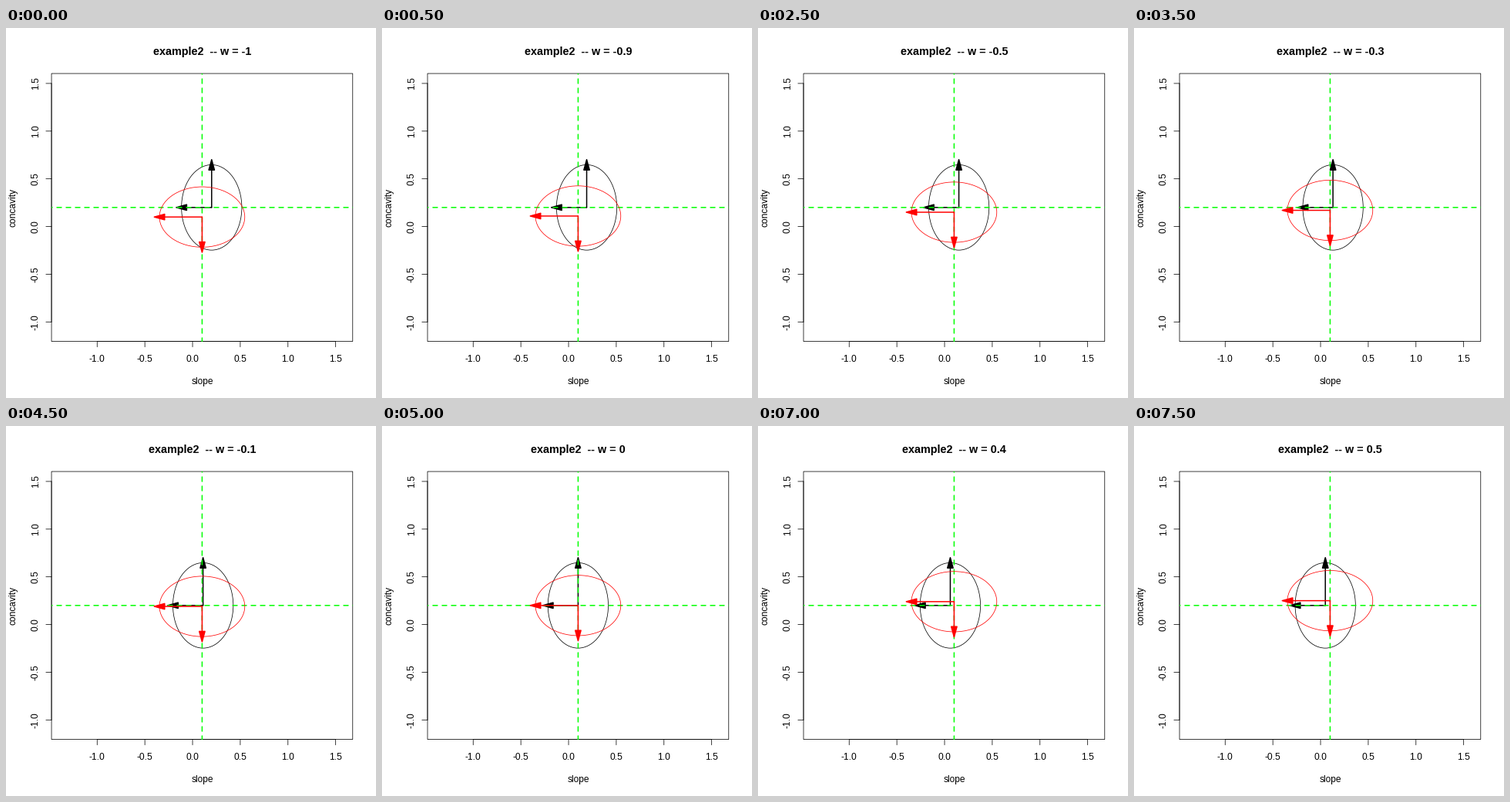
Animation of 480x480 px, one loop 8 s. Source, as a matplotlib script:

```python
import numpy as np
import matplotlib.pyplot as plt
from matplotlib.animation import FuncAnimation
from matplotlib.patches import Ellipse, Polygon, Rectangle

SIZE, DPI = 480, 96
PX = 72 / DPI                       # one pixel in points
LEFT, TOP, RIGHT, BOTTOM = 59.04, 59.04, 449.76, 406.56
SCALE = (BOTTOM - TOP) / 2.808      # pixels per data unit
CX, CY = 0.1, 0.2                   # crossing of the guide lines
MINOR, MAJOR = np.sqrt(0.1), np.sqrt(0.2)
THIN, THICK = 0.75, 1.5
TICK = 7.2
FRAMES, STEP_MS = 16, 500

plt.rcParams["font.family"] = "Liberation Sans"


def to_x(v):
    return (LEFT + RIGHT) / 2 + (v - CX) * SCALE


def to_y(v):
    return BOTTOM - (v + 1.204) * SCALE


fig = plt.figure(figsize=(SIZE / DPI, SIZE / DPI), dpi=DPI, facecolor="white")
ax = fig.add_axes([0, 0, 1, 1])
ax.set_xlim(0, SIZE)
ax.set_ylim(SIZE, 0)
ax.axis("off")


def line(xs, ys, color="black", width=THIN, **kw):
    kw.setdefault("solid_capstyle", "round")
    return ax.plot(xs, ys, color=color, lw=width * PX, snap=False, **kw)[0]


def label(x, y, text, size=12, **kw):
    return ax.text(x, y, text, fontsize=size * PX, ha="center",
                   va="baseline", rotation_mode="anchor", **kw)


def frame_rect():
    return Rectangle((LEFT, TOP), RIGHT - LEFT, BOTTOM - TOP, fill=False,
                     lw=THIN * PX, snap=False, zorder=1)


def draw_axes():
    ax.add_patch(frame_rect())
    ends = np.array([-1, 1.5])
    line(to_x(ends), [BOTTOM] * 2, zorder=1)
    line([LEFT] * 2, to_y(ends), zorder=1)
    for v in np.arange(-1, 1.6, 0.5):
        x, y = to_x(v), to_y(v)
        line([x, x], [BOTTOM, BOTTOM + TICK], zorder=1)
        line([LEFT, LEFT - TICK], [y, y], zorder=1)
        label(x, 433, f"{v:.1f}")
        label(42, y, f"{v:.1f}", rotation=90)
    label((LEFT + RIGHT) / 2, 462, "slope")
    label(13, (TOP + BOTTOM) / 2, "concavity", rotation=90)


def draw_guides():
    style = dict(color="#00ff00", width=THICK, linestyle=(0, (4, 4)),
                 dash_capstyle="round", zorder=3)
    clip = frame_rect()
    clip.set_transform(ax.transData)
    for xs, ys in (([to_x(CX)] * 2, [SIZE, 0]), ([SIZE, 0], [to_y(CY)] * 2)):
        line(xs, ys, **style).set_clip_path(clip)


class Arrow:
    """Shaft with a solid head centred on the end point."""

    HEAD = np.array([[6.75, 0], [-6.75, 3.7], [-6.75, -3.7]])

    def __init__(self, color, direction, length, z):
        self.dir = np.array(direction)
        self.length = length * SCALE
        self.shaft = line([], [], color, THICK, zorder=z)
        self.head = Polygon(self.HEAD, closed=True, fc=color, ec=color,
                            lw=THICK * PX, joinstyle="round", snap=False,
                            zorder=z)
        ax.add_patch(self.head)

    def move(self, x, y):
        start = np.array([x, y])
        end = start + self.dir * self.length
        normal = np.array([-self.dir[1], self.dir[0]])
        self.shaft.set_data([x, end[0]], [y, end[1]])
        self.head.set_xy(end + self.HEAD @ np.array([self.dir, normal]))


class Group:
    """Ellipse with one arrow along each half axis."""

    def __init__(self, color, rx, ry, vertical, z):
        self.ellipse = Ellipse((0, 0), 2 * rx * SCALE, 2 * ry * SCALE,
                               fill=False, ec=color, lw=THIN * PX, zorder=z)
        ax.add_patch(self.ellipse)
        self.arrows = [Arrow(color, (-1, 0), rx, z + 0.1),
                       Arrow(color, (0, vertical), ry, z + 0.1)]

    def move(self, x, y):
        x, y = to_x(x), to_y(y)
        self.ellipse.set_center((x, y))
        for arrow in self.arrows:
            arrow.move(x, y)


draw_axes()
draw_guides()
title = label((LEFT + RIGHT) / 2, 35, "", 14.4, weight="bold")
black = Group("black", MINOR, MAJOR, -1, 2)
red = Group("red", MAJOR, MINOR, 1, 4)


def update(i):
    w = (i - 10) / 10
    title.set_text(f"example2  -- w = {w:g}")
    black.move(CX - 0.1 * w, CY)
    red.move(CX, CY + 0.1 * w)
    return []


anim = FuncAnimation(fig, update, frames=FRAMES, interval=STEP_MS,
                     init_func=lambda: update(0), repeat=True, repeat_delay=0)
plt.show()
```
